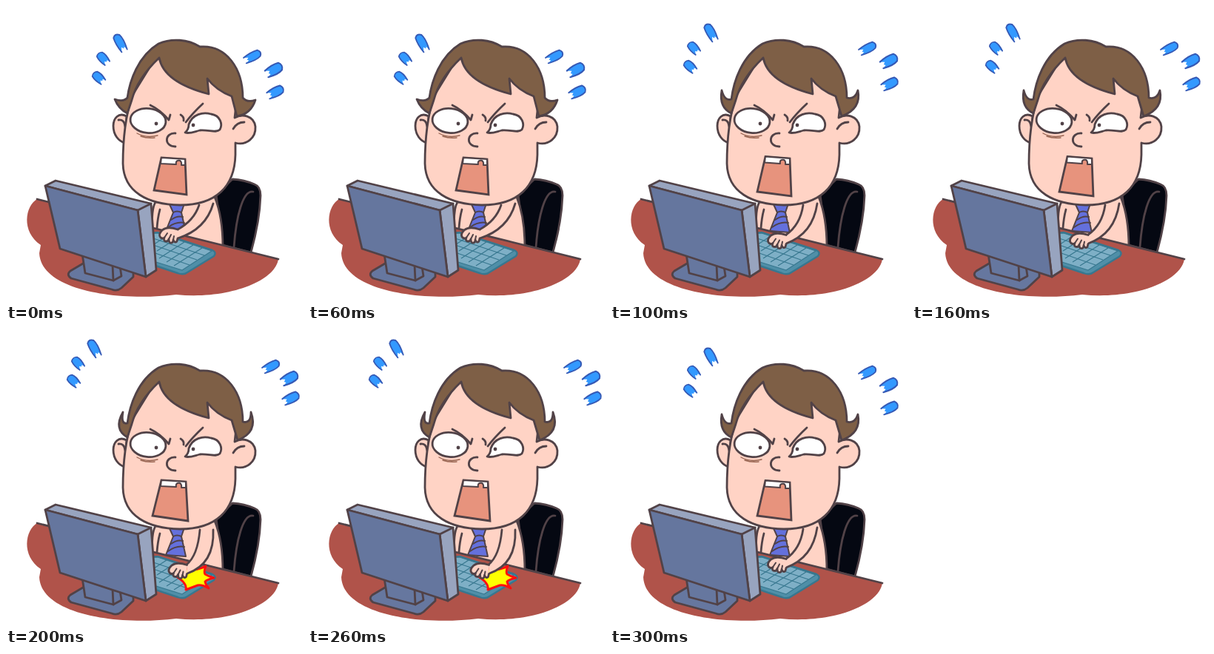
These frames come from a looping animation (400 px wide and 400 px high, 0.4 s). An HTML page:

```html
<!DOCTYPE html>
<html lang="en">
<head>
<meta charset="utf-8">
<title>Angry typing</title>
<style>
  html, body { margin: 0; height: 100%; overflow: hidden; background: #fff; }
  svg { display: block; width: 100vw; height: 100vh; }
  .ink { stroke: #514247; stroke-width: 2.8; stroke-linecap: round; stroke-linejoin: round; }
  .skin { fill: #ffd3c5; }
  .line { fill: none; }
  .drop { fill: #3399ff; stroke: #3559b5; stroke-width: 2; stroke-linejoin: round; stroke-linecap: round; }
</style>
</head>
<body>
<svg viewBox="0 0 400 400">
  <g class="ink" id="chair">
    <path fill="#050812" d="M284 255 L306 234 Q322 235 336 241 Q344 244 344 256 Q343 290 331 333 L293 323Z"/>
    <path class="line" d="M334 251 C320 248 311 285 308 326"/>
  </g>

  <g class="ink" id="body">
    <path class="skin" d="M202 265 Q196 274 198 306 L293 326 Q293 285 282 258Z"/>
    <path class="line" d="M208 275 Q205 286 204 300"/>
    <path fill="#6470dc" stroke-width="2" d="M220 266 L241 267 L237 279 L243 306 L216 304 L226 279Z"/>
    <path class="line" stroke-width="2" d="M226 279 Q231 276 237 279 M223 289 Q231 283 239 285 M219 299 Q230 291 241 293"/>
  </g>

  <path fill="#b0534a" d="M42 261 L368 342 C364 372 300 397 230 390 C150 400 47 384 45 334 L47 323 C20 305 26 270 42 261Z"/>
  <path class="ink line" d="M42 261 L368 342"/>

  <g id="keyboard" stroke="#37778f" stroke-linejoin="round">
    <path fill="#4f8fa8" stroke-width="2.4" d="M190 308 L205 306 L279 330 Q285 333 281 338 L245 360 Q240 364 232 361 L190 347Z"/>
    <path fill="#7eafc6" stroke-width="1.2" d="M190 308 L205 307 L278 331 L238 357 L190 342Z"/>
    <path class="line" stroke-width="1.2" d="M196 313 L268 337 M196 322 L258 343 M196 332 L248 350
      M217 311 L200 322 M229 315 L204 331 M241 319 L207 341 M253 323 L217 346 M265 327 L227 351"/>
  </g>

  <path id="burst" fill="#ffff00" stroke="#ff1010" stroke-width="3" stroke-linejoin="round"
    d="M230 333 Q241 331 243 321 Q249 326 254 324 Q263 323 270 319 Q267 327 269 330 Q274 333 281 335 Q272 337 269 340 Q270 345 274 349 Q265 344 259 345 Q251 348 243 351 Q245 342 230 333Z"/>

  <g class="ink" id="typing-arm">
    <path id="arm-fill" class="skin" stroke="none"/>
    <path id="arm-line" class="line"/>
    <g id="hand">
      <path class="skin" d="M232 302 Q218 297 211 303 Q205 309 209 313 Q212 315 214 313 Q212 318 217 318 Q219 318 220 315 Q220 321 224 320 Q226 319 226 316 Q228 321 231 318 L232 314"/>
      <path class="line" stroke-width="2" d="M214 313 L218 307 M220 315 L223 309 M226 316 L227 311"/>
    </g>
  </g>

  <g class="ink" id="monitor">
    <path fill="#66779f" d="M104 348 L87 358 Q81 363 88 368 L143 383 Q150 386 156 381 L172 366 L172 350Z"/>
    <path fill="#66779f" d="M103 335 L107 361 L145 371 L156 365 L153 345Z"/>
    <path class="line" d="M144 350 L145 371"/>
    <path fill="#98a4bf" d="M53 243 L67 236 L196 267 L203 357 L189 366 L178 276Z"/>
    <path fill="#65769e" d="M53 243 L178 276 L189 366 L73 328Z"/>
    <path class="line" d="M178 276 L196 267"/>
  </g>

  <g class="ink" id="head">
    <path class="skin" d="M163 149 C152 143 145 152 145 162 C145 174 152 183 161 185Z"/>
    <path class="line" d="M152 154 Q160 153 161 163"/>
    <path class="skin" d="M170 122 C160 154 158 185 158 213 C159 252 192 268 235 269 C284 269 309 244 310 201 L310 185 C325 189 338 178 337 163 C335 148 319 145 309 151 L313 115 L207 62Z"/>
    <path class="line" d="M307 166 Q312 157 322 157"/>
    <path id="hair" fill="#7e5f46"/>

    <ellipse cx="192" cy="155" rx="24" ry="16.5" transform="rotate(6 192 155)" fill="#fff"/>
    <path fill="#fff" d="M242 171 Q247 167 247 160 C252 146 266 143 277 146 C290 148 293 160 289 167 C284 172 274 167 262 168 C254 170 248 173 242 171Z"/>
    <g fill="#514247" stroke="none">
      <circle cx="203" cy="159" r="2.4"/>
      <circle cx="253" cy="161" r="2.4"/>
    </g>
    <path class="line" d="M195 134 Q208 140 220 154 L222 147 M266 132 Q252 145 243 157 M236 147 Q241 150 240 155"/>
    <path class="line" d="M229 172 C214 171 213 190 229 190"/>
    <path class="line" stroke="#976451" stroke-width="1.4" d="M177 172 Q190 179 205 175 M182 176 Q190 179 201 178"/>

    <path id="mouth" fill="#e7937d" stroke-linejoin="miter"/>
    <path id="teeth" fill="#fff" stroke-width="2"/>
  </g>

  <g id="drops"></g>
</svg>
<script>
const byId = id => document.getElementById(id);
const setPath = (id, d) => byId(id).setAttribute('d', d);

// Three poses, from raised hand to key strike.
const poses = [
  {
    leftTuft: 'Q152 139 147 126 Q159 130 164 124', rightTuft: 'Q326 131 337 127 Q331 146 312 149',
    mouth: [210, 205, 242, 207, 244, 255, 200, 249], hand: [0, 0],
    armTop: 'M261 269 Q254 290 232 302', armBottom: 'M280 267 Q270 302 232 314'
  },
  {
    leftTuft: 'Q147 137 151 114 Q155 129 164 126', rightTuft: 'Q331 127 335 114 Q340 139 313 149',
    mouth: [210, 203.5, 243, 206, 245, 257, 199, 251], hand: [6, 7.5],
    armTop: 'M261 269 Q257 296 238 309', armBottom: 'M280 267 Q274 308 238 321'
  },
  {
    leftTuft: 'Q145 134 158 111 Q155 128 164 126', rightTuft: 'Q331 127 331 111 Q341 138 313 149',
    mouth: [210, 203, 243, 205, 246, 258, 198, 251], hand: [12.5, 15.5],
    armTop: 'M262 270 Q259 305 244 317', armBottom: 'M280 270 Q282 316 245 329'
  }
];

// Each drop: length, width, angle, then its centre in every pose.
const drops = [
  [26, 11, -118, [154, 50], [136, 36], [119, 25]],
  [19, 11, -130, [131, 71], [113, 57], [97, 45]],
  [19, 11, -135, [125, 97], [108, 82], [91, 69]],
  [25, 11, -27, [333, 68], [348, 57], [358, 49]],
  [25, 13, -28, [362, 86], [377, 74], [383, 65]],
  [24, 12, -26, [364, 116], [378, 105], [385, 92]]
].map(([length, width, angle, ...centres]) => {
  const group = document.createElementNS('http://www.w3.org/2000/svg', 'g');
  const sx = length / 26, sy = width / 12;
  group.innerHTML = `<g transform="rotate(${angle}) scale(${sx} ${sy})" class="drop">
    <path stroke="none" d="M-12 5 Q3 8 10 5 Q15 0 10 -5 Q0 -7 -12 -4 L-6 -1 L-9 1 L-7 3Z"/>
    <path fill="none" d="M-12 5 Q3 8 10 5 Q15 0 10 -5 Q0 -7 -12 -4"/></g>`;
  byId('drops').append(group);
  return { group, centres };
});

function showPose(index) {
  const { leftTuft, rightTuft, mouth: m, hand, armTop, armBottom } = poses[index];
  setPath('hair', `M207 70 C190 86 176 104 170 127 L164 145 ${leftTuft}
    C167 102 178 68 206 51 C224 43 246 45 262 55 C298 52 320 85 320 124 ${rightTuft}
    L305 122 Q284 114 272 98 L274 119 Q213 103 207 70Z`);
  setPath('mouth', `M${m}Z`);
  const [left, top, right, topRight] = m;
  setPath('teeth', `M${left} ${top} L${right} ${topRight} L${right} ${topRight + 8}
    L237 ${topRight + 8} Q238 ${topRight + 1} 232 ${topRight + 2} Q229 ${topRight + 3} 230 ${topRight + 7} L${left - 1} ${top + 8}Z`);
  setPath('arm-line', armTop + armBottom);
  // Closing the area runs up the lower edge and back down the upper one.
  const [start, bend, end] = armBottom.slice(1).match(/\d+ \d+/g);
  setPath('arm-fill', `${armTop} L${end} Q${bend} ${start}Z`);
  byId('hand').setAttribute('transform', `translate(${hand})`);
  byId('burst').style.display = index === 2 ? '' : 'none';
  for (const { group, centres } of drops) {
    group.setAttribute('transform', `translate(${centres[index]})`);
  }
}

const order = [0, 1, 2, 1];
const begin = performance.now();
function tick() {
  const step = Math.floor((performance.now() - begin) / 100) % order.length;
  showPose(order[step]);
  requestAnimationFrame(tick);
}
tick();
</script>
</body>
</html>
```
